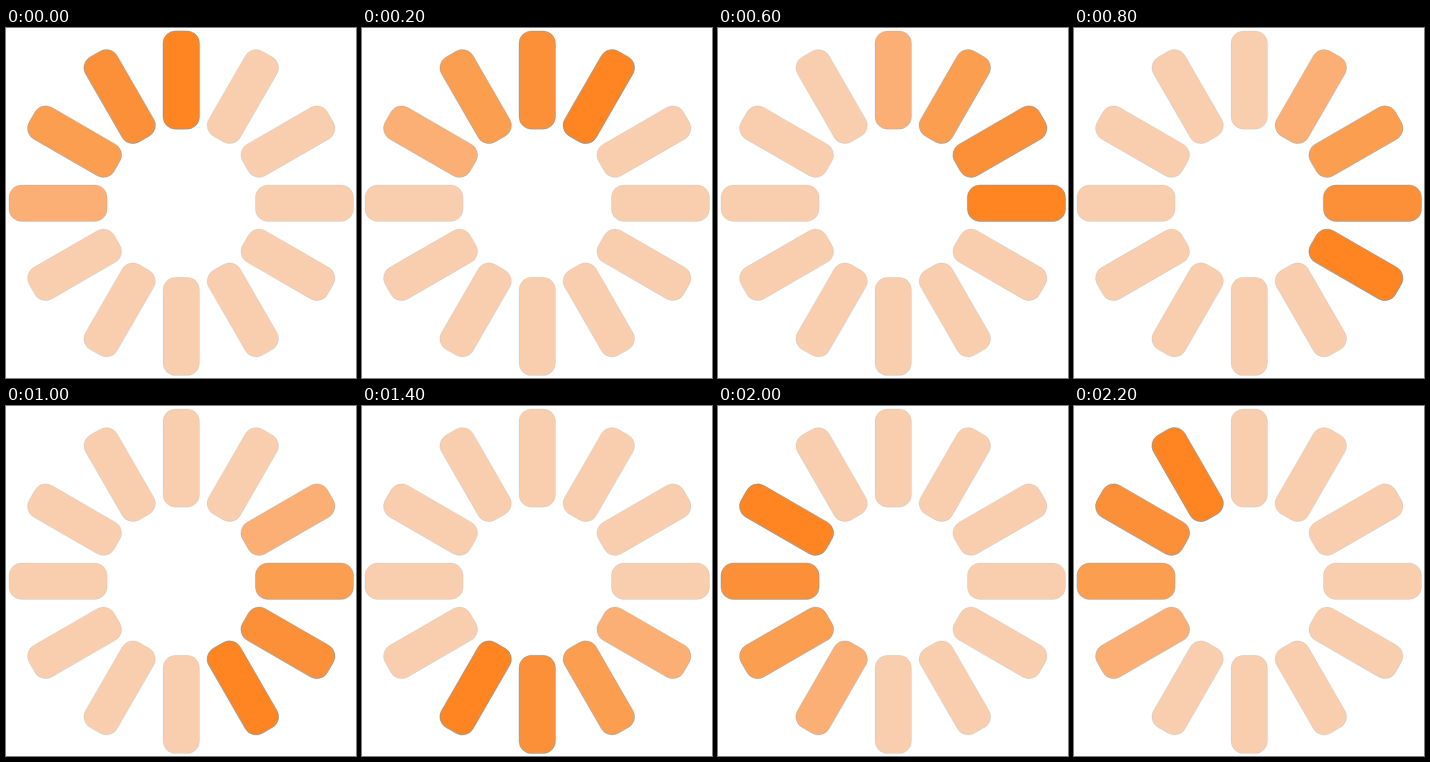
Recreate the animation shown at these times as an HTML page. Size 350x350 px, loop 2.4 s.

```html
<!DOCTYPE html>
<html lang="en">
<head>
<meta charset="utf-8">
<title>Spinner</title>
<style>
  html, body { margin: 0; width: 100%; height: 100%; overflow: hidden; background: #fff; }
  svg { display: block; width: 100%; height: 100%; }
</style>
</head>
<body>
<svg id="stage" viewBox="0 0 350 350"></svg>
<script>
const COUNT = 12;
const STEP = 200;
const CENTER = 175.25;
const TRAIL = ['#ff8522', '#fb9038', '#fc9e50', '#fbaf74'];
const REST = '#f8ceae';
const EDGE = [0.8, 0.65, 0.5, 0.35];
const REST_EDGE = 0.2;

const stage = document.getElementById('stage');

function makeBar(index) {
  const bar = document.createElementNS('http://www.w3.org/2000/svg', 'rect');
  const attributes = {
    x: -18.25, y: -172.3, width: 36.5, height: 98.2, rx: 12.5,
    stroke: '#3a9ae0', 'stroke-width': 0.5,
    transform: `translate(${CENTER} ${CENTER}) rotate(${index * 360 / COUNT})`
  };
  for (const [name, value] of Object.entries(attributes)) bar.setAttribute(name, value);
  return stage.appendChild(bar);
}

const bars = Array.from({ length: COUNT }, (_, index) => makeBar(index));

function render(time) {
  const head = Math.floor(time / STEP) % COUNT;
  bars.forEach((bar, index) => {
    const age = (head - index + COUNT) % COUNT;
    bar.setAttribute('fill', TRAIL[age] ?? REST);
    bar.setAttribute('stroke-opacity', EDGE[age] ?? REST_EDGE);
  });
}

const start = performance.now();
function tick() {
  render(performance.now() - start);
  requestAnimationFrame(tick);
}
tick();
</script>
</body>
</html>
```
